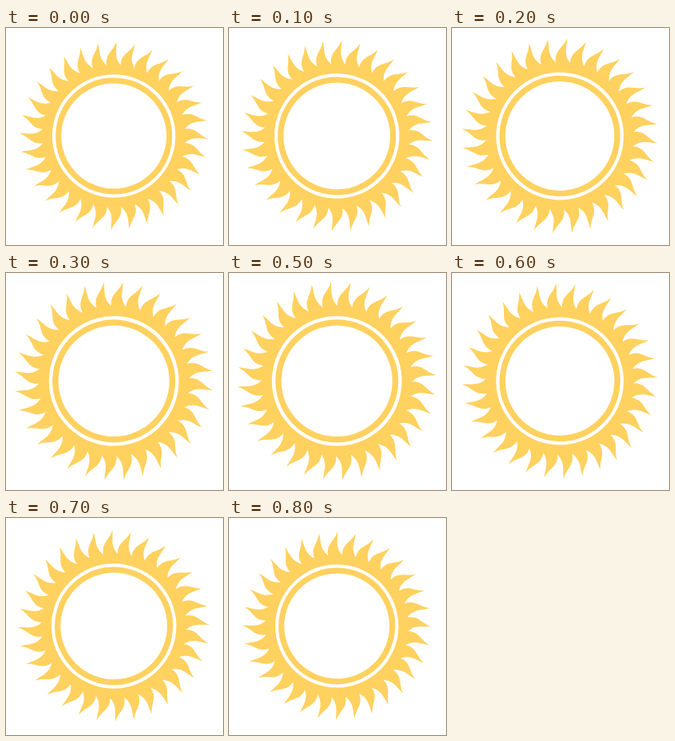
An HTML page that plays this animation: 272 by 272 pixels, repeating every 0.9 s.

```html
<!DOCTYPE html>
<html lang="en">
<head>
<meta charset="utf-8">
<title>Sun</title>
<style>
  html, body { margin: 0; width: 100%; height: 100%; overflow: hidden; background: #fff; }
  svg { display: block; width: 100%; height: 100%; }
</style>
</head>
<body>
<svg viewBox="0 0 272 272">
  <g id="sun">
    <path id="rays" fill="#ffd15f"/>
    <circle r="75.5" fill="#ffd15f" stroke="#fff" stroke-width="4.2"/>
    <circle r="66.3" fill="#fff"/>
  </g>
</svg>
<script>
const LOOP = 900, STEP = 100, RAYS = 32, PITCH = 360 / RAYS;
const VALLEY = [-11.5, 89];
const sun = document.getElementById('sun');

// Turns a point given relative to an upright ray tip into the ray's own direction.
function turn(x, r, deg) {
  const a = deg * Math.PI / 180, c = Math.cos(a), s = Math.sin(a);
  return (x * c + r * s).toFixed(2) + ' ' + (x * s - r * c).toFixed(2);
}

// One flame: up the full side to the tip, then down to the next valley.
function flame(i) {
  const p = (x, r) => turn(x, r, i * PITCH);
  return `C${p(-14, 104)} ${p(-4, 106)} ${p(0, 119)}` +
         `C${p(1, 108)} ${p(-3, 100)} ${turn(...VALLEY, (i + 1) * PITCH)}`;
}

let outline = 'M' + turn(...VALLEY, 0);
for (let i = 0; i < RAYS; i++) outline += flame(i);
document.getElementById('rays').setAttribute('d', outline + 'Z');

function draw(ms) {
  const t = Math.floor(ms % LOOP / STEP) * STEP;
  const angle = 1.6 + PITCH * t / LOOP;
  const scale = 1.025 + 0.032 * Math.cos(2 * Math.PI * (t - 400) / LOOP);
  sun.setAttribute('transform', `translate(135.2 135.4) rotate(${angle}) scale(${scale})`);
}

const start = performance.now();
function tick() {
  draw(performance.now() - start);
  requestAnimationFrame(tick);
}
draw(0);
requestAnimationFrame(tick);
</script>
</body>
</html>
```
